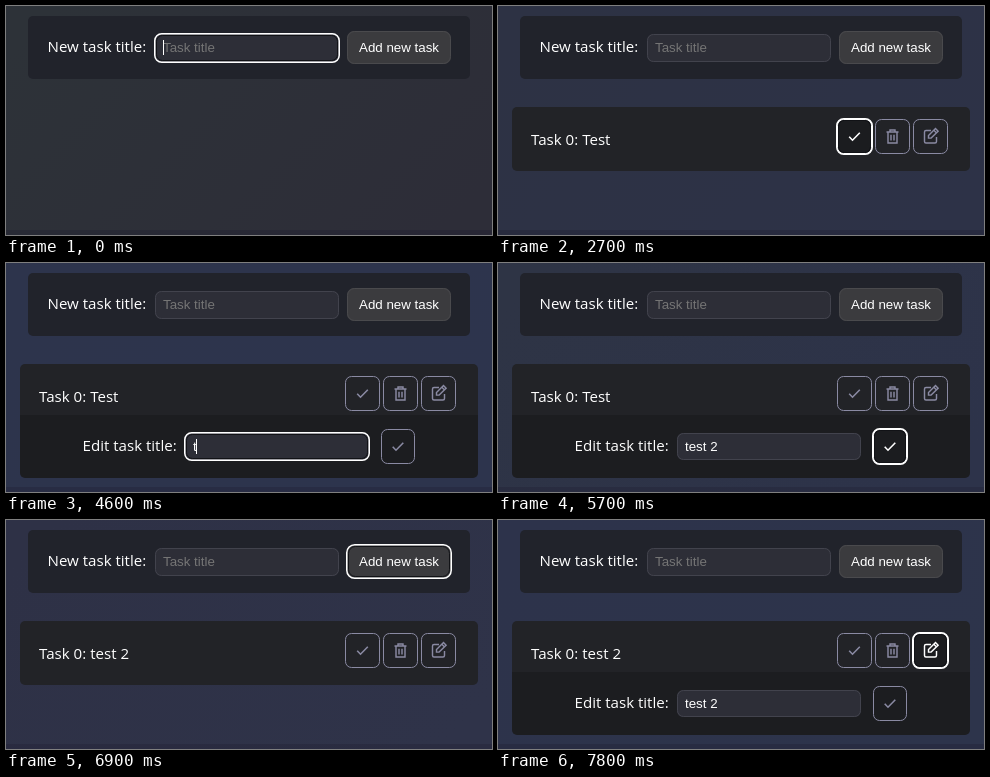
These frames come from a looping animation (486 by 229 pixels, 8 s). An HTML page with a canvas:

```html
<!DOCTYPE html>
<html lang="en">
<head>
<meta charset="utf-8">
<title>Task list</title>
<style>
html, body { margin: 0; width: 100%; height: 100%; overflow: hidden; background: #2d3039; }
canvas { display: block; }
</style>
</head>
<body>
<canvas id="stage" width="486" height="229"></canvas>
<script>
const ctx = document.getElementById('stage').getContext('2d');
const LOOP = 8000, STEP = 100;
const LABEL = '15.1px "Open Sans", "Noto Sans", sans-serif';
const FIELD = '13.333px "Liberation Sans", Arial, sans-serif';
const MUTED = [138, 138, 163], WHITE = [255, 255, 255];

// time, top-left colour, bottom-right colour
const sky = [
  [0, [45, 50, 56], [45, 45, 56]],
  [1700, [45, 48, 59], [45, 47, 61]],
  [3700, [45, 52, 76], [45, 52, 80]],
  [4600, [45, 52, 76], [45, 52, 77]],
  [5700, [46, 52, 69], [45, 51, 74]],
  [6900, [46, 49, 70], [47, 51, 73]],
  [8000, [45, 52, 76], [45, 52, 75]]
];
const focusLog = [
  [0, 'title'], [2100, 'add'], [2600, 'done'], [3500, 'trash'], [3600, 'edit'],
  [4100, 'rename'], [5600, 'save'], [6000, ''], [6600, 'title'], [6800, 'add'],
  [7100, 'done'], [7300, 'trash'], [7400, 'edit']
];
const titleLog = [[0, ''], [1000, 'T'], [1100, 'Te'], [1300, 'Test'], [1700, '']];
const renameLog = [
  [0, 'Test'], [4600, 't'], [4700, 'te'], [4800, 'tes'], [4900, 'test'],
  [5100, 'test '], [5200, 'test 2']
];
const caretLog = [
  [0, 1], [200, 0], [400, 1], [600, 0], [800, 1], [1500, 0], [1700, 1],
  [1900, 0], [4600, 1], [5400, 0], [6600, 1]
];

const indexAt = (log, t) => log.findLastIndex(e => e[0] <= t);
const valueAt = (log, t) => log[indexAt(log, t)][1];
const mix = (a, b, k) => a.map((v, i) => v + (b[i] - v) * k);
const rgb = c => `rgb(${c.map(Math.round).join(',')})`;

function box(x, y, w, h, r, fill, line) {
  if (fill) {
    ctx.beginPath();
    ctx.roundRect(x, y, w, h, r);
    ctx.fillStyle = fill;
    ctx.fill();
  }
  if (line) {
    ctx.beginPath();
    ctx.roundRect(x + 0.5, y + 0.5, w - 1, h - 1, r);
    ctx.strokeStyle = line;
    ctx.lineWidth = 1;
    ctx.stroke();
  }
}

function ring(x, y, w, h, r, alpha = 1) {
  ctx.save();
  ctx.globalAlpha = alpha;
  box(x + 1, y + 1, w - 2, h - 2, r - 1, null, '#111216');
  ctx.beginPath();
  ctx.roundRect(x - 0.25, y - 0.25, w + 0.5, h + 0.5, r);
  ctx.strokeStyle = '#fff';
  ctx.lineWidth = 1.5;
  ctx.stroke();
  ctx.restore();
}

function text(str, x, y, font, color) {
  ctx.font = font;
  ctx.fillStyle = color;
  ctx.fillText(str, x, y);
}

const icons = {
  check: new Path2D('M-5.3 .3L-2 3.7L5.3 -3.7'),
  trash: new Path2D('M-6 -4.5H6M-2.5 -4.5V-6.5H2.5V-4.5M-4.5 -4.5V6.5H4.5V-4.5M-1.5 -1.8V4M1.5 -1.8V4'),
  pencil: new Path2D('M.5 -6H-4.5Q-6 -6 -6 -4.5V5Q-6 6.5 -4.5 6.5H4.5Q6 6.5 6 5V.5' +
    'M-2 1.6V-.9L5 -7.9L7.6 -5.3L.6 1.6ZM3.4 -6.2L5.8 -3.8')
};

// level runs 0 to 1 as a button takes focus, and fades after it leaves
function focusLevel(id, t) {
  const i = indexAt(focusLog, t), since = t - focusLog[i][0];
  if (focusLog[i][1] === id) return Math.min(1, (since + STEP) / 200);
  const left = i > 0 && focusLog[i - 1][1] === id;
  return left && since < STEP ? 0.5 : 0;
}

function iconButton(id, icon, x, y, w, t) {
  const level = focusLevel(id, t), active = valueAt(focusLog, t) === id;
  const color = rgb(mix(MUTED, WHITE, level));
  box(x, y, w, 35, 6, active ? '#1b1c1f' : null, color);
  if (active) ring(x, y, w, 35, 7, level);
  ctx.save();
  ctx.translate(x + w / 2, y + 17.5);
  ctx.strokeStyle = color;
  ctx.lineWidth = icon === 'check' ? 1.6 : 1.45;
  ctx.stroke(icons[icon]);
  ctx.restore();
}

function field(id, x, y, h, value, hint, t) {
  const active = valueAt(focusLog, t) === id;
  const left = x + 8, base = y + 18, top = base - 12;
  box(x, y, 184, h, 6, '#2d2e37', '#42434d');
  if (active) ring(x, y, 184, h, 7);
  ctx.font = FIELD;
  const width = ctx.measureText(value).width;
  const selected = id === 'rename' && active && t < 4600;
  if (selected) {
    ctx.fillStyle = '#0078d7';
    ctx.fillRect(left, top, width, 15);
  }
  text(value || hint, left, base, FIELD, value ? '#fff' : '#757575');
  if (active && !selected && valueAt(caretLog, t)) {
    ctx.fillStyle = '#fff';
    ctx.fillRect(Math.floor(left + width), top, 1, 15);
  }
}

function background(t) {
  const i = Math.min(indexAt(sky, t), sky.length - 2);
  const [t0, a0, b0] = sky[i], [t1, a1, b1] = sky[i + 1];
  const k = (t - t0) / (t1 - t0);
  const g = ctx.createLinearGradient(90, -40, 396, 266);
  g.addColorStop(0, rgb(mix(a0, a1, k)));
  g.addColorStop(1, rgb(mix(b0, b1, k)));
  ctx.fillStyle = g;
  ctx.fillRect(0, 0, 486, 229);
  ctx.fillStyle = 'rgba(32,28,46,0.3)';
  ctx.fillRect(0, 224, 486, 5);
}

function form(t) {
  box(22, 10, 442, 63, 5, '#21232b');
  text('New task title:', 41.5, 46, LABEL, '#fff');
  field('title', 149, 28, 28, valueAt(titleLog, t), 'Task title', t);
  box(341, 25, 104, 33, 7, '#3b3b3e', '#4a4a4d');
  if (valueAt(focusLog, t) === 'add') ring(341, 25, 104, 33, 8, focusLevel('add', t));
  text('Add new task', 353, 46, FIELD, '#fff');
}

function task(t) {
  const open = t >= 3800 && t < 6000 || t >= 7800;
  box(14, 101, 458, 64, 5, '#222327');
  if (open) box(14, 152, 458, 63, [0, 0, 5, 5], '#1c1d20');
  text('Task 0: ' + (t < 6000 ? 'Test' : 'test 2'), 33, 139, LABEL, '#fff');
  iconButton('done', 'check', 339, 113, 35, t);
  iconButton('trash', 'trash', 377, 113, 35, t);
  iconButton('edit', 'pencil', 415, 113, 35, t);
  if (!open) return;
  text('Edit task title:', 76.5, 188, LABEL, '#fff');
  field('rename', 179, 170, 27, valueAt(renameLog, t), '', t);
  iconButton('save', 'check', 375, 166, 34, t);
}

function frame(now) {
  const t = now % LOOP, tick = Math.floor(t / STEP) * STEP;
  background(t);
  form(tick);
  if (tick >= 1700) task(tick);
  requestAnimationFrame(frame);
}
requestAnimationFrame(frame);
</script>
</body>
</html>
```
